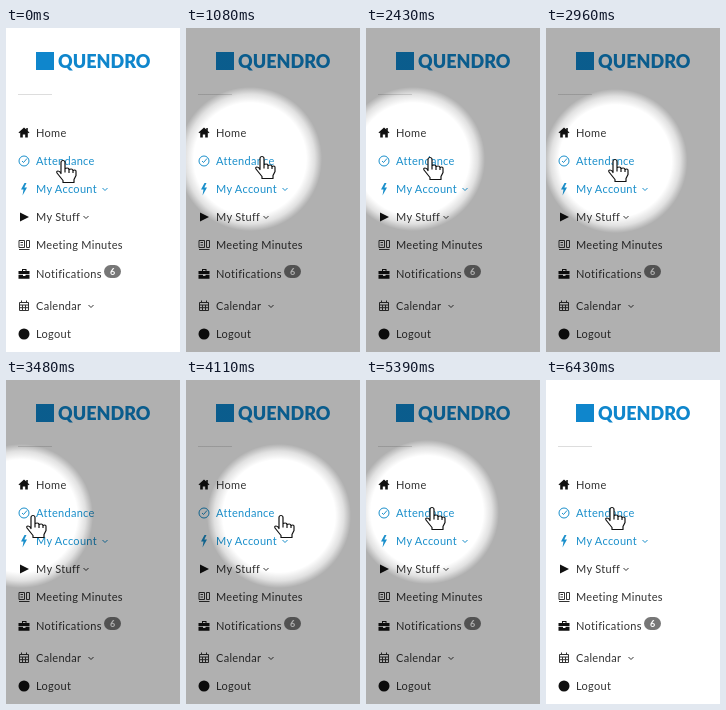
These frames come from a looping animation (174x324 px, 7310 ms). An HTML page:

```html
<!DOCTYPE html>
<html lang="en">
<head>
<meta charset="utf-8">
<title>Menu spotlight</title>
<style>
html, body { margin: 0; width: 100%; height: 100%; overflow: hidden; background: #fff; }
svg { display: block; width: 174px; height: 324px; }
text { font: 11px Lato, sans-serif; letter-spacing: .3px; fill: #333; }
.on { fill: #1a8fcb; }
.brand { font-size: 18px; font-weight: 900; letter-spacing: 0; fill: #0f86cc; }
.count { font-size: 9px; font-weight: 700; letter-spacing: 0; fill: #fff; text-anchor: middle; }
.line { fill: none; stroke: #333; stroke-width: 1; }
.blue { stroke: #1a8fcb; }
</style>
</head>
<body>
<svg viewBox="0 0 174 324">
  <defs>
    <radialGradient id="spot" gradientUnits="userSpaceOnUse" r="72">
      <stop offset=".78" stop-opacity="0"/>
      <stop offset=".9" stop-opacity=".12"/>
      <stop offset="1" stop-opacity=".31"/>
    </radialGradient>
  </defs>
  <rect width="174" height="324" fill="#fff"/>

  <rect x="30" y="24" width="18" height="18" fill="#0f86cc"/>
  <text class="brand" x="52" y="39.5">QUENDRO</text>
  <path d="M12 66.5H46" stroke="#ddd"/>

  <g id="menu"></g>

  <g fill="#111">
    <path d="M12.5 104.5L18 99.5l2.3 2v-1.5h1.5v3l1.7 1.5-.8.8-.9-.7v4.9h-2.6v-3h-2.4v3h-2.6v-4.9l-.9.7z"/>
    <path d="M14 184.5l9 4.5-9 4.5z"/>
    <path d="M12.5 243h3.5v-2h4.500v2h3v3h-11zm4.500 0h2.500v-1h-2.500zM12.500 246.700h4.500v1.300h2.500v-1.300h4v4h-11z"/>
    <circle cx="18" cy="306" r="5.5"/>
  </g>
  <path class="on" d="M18.500 155l-3.500 6.500h2.500l-1 6 4.500-8h-2.700l2.200-4.500z"/>
  <g class="line blue">
    <circle cx="18" cy="133" r="5"/>
    <path d="M16 133l1.500 1.500 3.500-4"/>
  </g>
  <g class="line">
    <path d="M13 212.500h5.500v7H13zM14.500 214.500h2.500M14.500 217h2.500M20.500 212.500h3v7h-3zM13 221.500h10.500"/>
    <path d="M13.500 274.500h9v8h-9zM13.500 277h9M15.500 272.500v2M20.500 272.500v2M16.500 277v5M19.500 277v5M13.500 279.700h9"/>
  </g>

  <rect x="98" y="237" width="17" height="13" rx="6.500" fill="#777"/>
  <text class="count" x="106.500" y="246.500">6</text>

  <rect id="dim" width="174" height="324" fill="url(#spot)"/>
  <path id="hand" fill="#fff" stroke="#111" stroke-width="1.200" stroke-linejoin="round"
    d="M-2 11V1.500a2 2 0 0 1 4 0V8q0-1 2-1t2 2q0-1 2-1t2 2q0-1 1.600-1t1.400 2V14.500l-2 4V21.500H0v-2l-6-7.500q-.8-2 1-2t3 2.500zM6 9v3M10 10v2M2 8v3.500"/>
</svg>
<script>
const $ = id => document.getElementById(id);
const LOOP = 7310;

// label, middle y, highlighted, chevron x
const items = [
  ['Home', 105], ['Attendance', 133, 1], ['My Account', 161, 1, 99],
  ['My Stuff', 189, 0, 80], ['Meeting Minutes', 217], ['Notifications', 246],
  ['Calendar', 278, 0, 85], ['Logout', 306]
];
$('menu').innerHTML = items.map(([label, y, on, arrow]) =>
  `<text x="30" y="${y + 4}" class="${on ? 'on' : ''}">${label}</text>` +
  (arrow ? `<path class="line ${on ? 'blue' : ''}" d="M${arrow - 2.5} ${y - 1}l2.500 2.500 2.500-2.500"/>` : '')
).join('');

// time, hand x, hand y, light x, light y
const path = [
  [0, 57, 133, 53, 133], [170, 57, 133, 53, 133], [740, 62, 132, 60, 132],
  [1080, 76, 129, 64, 131], [1360, 101, 128, 99, 128], [1560, 78, 134, 77, 136],
  [1700, 36, 134, 34, 136], [1860, 21, 133, 19, 135], [2010, 22, 133, 19, 135],
  [2290, 45, 132, 30, 133], [2430, 64, 130, 47, 131], [2830, 96, 131, 95, 132],
  [3220, 16, 135, 18, 135], [3480, 27, 136, 15, 136], [3990, 94, 136, 86, 136],
  [4110, 95, 136, 93, 136], [4470, 62, 132, 64, 133], [4840, 70, 129, 70, 131],
  [5390, 66, 128, 61, 132], [LOOP, 66, 128, 61, 132]
];

// first, last and count of evenly spaced redraws
const ticks = [
  [0, 0, 1], [170, 170, 1], [350, 740, 4], [1080, 1080, 1], [1230, 1360, 2],
  [1560, 1560, 1], [1700, 1700, 1], [1860, 2430, 5], [2570, 3220, 6],
  [3350, 3990, 6], [4110, 4840, 7], [5260, 5390, 2]
].flatMap(([a, b, n]) => Array.from({ length: n }, (_, i) => a + (n > 1 ? (b - a) * i / (n - 1) : 0)));

function poseAt(t) {
  const i = path.findIndex(k => k[0] > t);
  const a = path[i - 1], b = path[i];
  const u = (t - a[0]) / (b[0] - a[0]);
  return a.map((v, j) => v + (b[j] - v) * u);
}

function draw(now) {
  const t = now % LOOP;
  const [, hx, hy, cx, cy] = poseAt(ticks.filter(s => s <= t).pop());
  $('hand').setAttribute('transform', `translate(${Math.round(hx)} ${Math.round(hy)})`);
  $('spot').setAttribute('cx', cx);
  $('spot').setAttribute('cy', cy);
  $('dim').setAttribute('opacity', t < 170 || t >= 6430 ? 0 : t < 6300 ? 1 : .5);
}

const start = performance.now();
function frame() {
  draw(performance.now() - start);
  requestAnimationFrame(frame);
}
frame();
</script>
</body>
</html>
```
